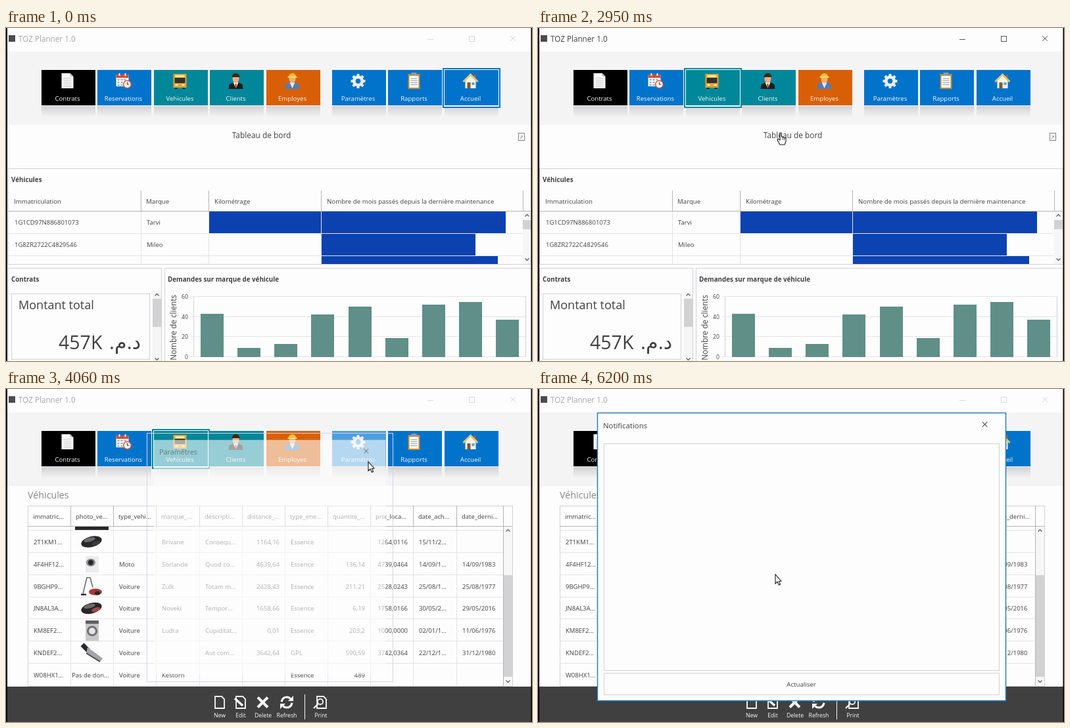
An HTML page with a canvas that plays this animation: 800x508 px, repeating every 7080 ms.

```html
<!DOCTYPE html>
<html lang="fr">
<head>
<meta charset="utf-8">
<title>Tableau de bord</title>
<style>
html, body { margin: 0; width: 100%; height: 100%; overflow: hidden; background: #fdfdfd; }
canvas { display: block; }
</style>
</head>
<body>
<canvas id="stage" width="800" height="508"></canvas>
<script>
const g = document.getElementById('stage').getContext('2d');
const LOOP = 7080, STEP = LOOP / 96;
const WHITE = '#fdfdfd', INK = '#404040', LINE = '#d2d2d6', SOFT = '#e4e4e8', MID = '#b4b4b8';
const BLUE = '#0273ca', TEAL = '#00879a', ORANGE = '#d95f06', BAR = '#0c42b0', DIALOG = '#2a7ebe';
const DARK = '#404040';

const clamp = v => Math.max(0, Math.min(1, v));
const ramp = (t, start, span) => clamp((t - start) / span);
const sine = u => (1 - Math.cos(Math.PI * u)) / 2;

function rect(x, y, w, h, color) {
  g.fillStyle = color;
  g.fillRect(x, y, w, h);
}
function frame(x, y, w, h, color, width = 1) {
  g.strokeStyle = color;
  g.lineWidth = width;
  g.strokeRect(x + .5, y + .5, w, h);
}
function path(points, color, width = 1, closed = false) {
  g.beginPath();
  points.forEach(([x, y]) => g.lineTo(x, y));
  if (closed) g.closePath();
  g.strokeStyle = color;
  g.lineWidth = width;
  g.stroke();
}
function poly(points, color) {
  g.beginPath();
  points.forEach(([x, y]) => g.lineTo(x, y));
  g.fillStyle = color;
  g.fill();
}
function oval(x, y, rx, ry, color, turn = 0) {
  g.beginPath();
  g.ellipse(x, y, rx, ry, turn, 0, Math.PI * 2);
  g.fillStyle = color;
  g.fill();
}
function text(s, x, y, size = 9.7, color = INK, align = 'left', weight = 400) {
  g.font = `${weight} ${size}px "Open Sans", "DejaVu Sans", sans-serif`;
  g.textAlign = align;
  g.fillStyle = color;
  g.fillText(s, x, y);
}
function at(x, y, scale, draw) {
  g.save();
  g.translate(x, y);
  g.scale(scale, scale);
  draw();
  g.restore();
}
const hline = (x, y, w, color = LINE) => rect(x, y, w, 1, color);
const vline = (x, y, h, color = LINE) => rect(x, y, 1, h, color);
const cross = (x, y, r, color, width = 1) => {
  path([[x - r, y - r], [x + r, y + r]], color, width);
  path([[x + r, y - r], [x - r, y + r]], color, width);
};
const chevron = (x, y, d) => path([[x - 3, y + d], [x, y - d], [x + 3, y + d]], '#606060', 1.3);

function scrollbar(x, top, bottom, thumbY, thumbH) {
  rect(x, top, 13, bottom - top, '#f6f6f7');
  chevron(x + 6.5, top + 6, 1.5);
  chevron(x + 6.5, bottom - 7, -1.5);
  rect(x, thumbY, 13, thumbH, '#d2d2d4');
}

// Icons are drawn around their own centre.
function gear(color, hole) {
  g.fillStyle = color;
  for (let i = 0; i < 8; i++) {
    g.save();
    g.rotate(i * Math.PI / 4);
    g.fillRect(-2, -11, 4, 5);
    g.restore();
  }
  oval(0, 0, 8.5, 8.5, color);
  oval(0, 0, 3.8, 3.8, hole);
}
function bus() {
  rect(-10, -11, 20, 21, '#eaa224');
  rect(-7, -9, 14, 3, '#fff0b0');
  rect(-8, -5, 16, 8, '#303034');
  rect(-7, 5, 4, 2, '#fff8e0');
  rect(3, 5, 4, 2, '#fff8e0');
  rect(-8, 10, 4, 2, '#303034');
  rect(4, 10, 4, 2, '#303034');
}
function sheet() {
  poly([[-9, -12], [4, -12], [9, -7], [9, 11], [-9, 11]], '#fafafa');
  poly([[4, -12], [4, -7], [9, -7]], '#c4c4c8');
  for (let y = -5; y < 9; y += 3) hline(-6, y, 12, '#c4c4c8');
}
function calendar() {
  rect(-11, -10, 19, 18, '#f8f8f8');
  rect(-11, -10, 19, 5, '#d84c34');
  rect(-7, -12, 2, 4, '#eeeeee');
  rect(2, -12, 2, 4, '#eeeeee');
  for (let i = 0; i < 9; i++) rect(-9 + i % 3 * 5, -3 + (i / 3 | 0) * 4, 3, 2, '#9ca8b8');
  oval(6, 5, 6.5, 6.5, '#d05838');
  oval(6, 5, 5, 5, '#f8f8f8');
  path([[6, 1.5], [6, 5], [9, 5]], '#404040', 1.2);
}
function person(hair, coat, shirt) {
  poly([[-11, 12], [-10, 5], [-4, 2], [4, 2], [10, 5], [11, 12]], coat);
  poly([[-4, 2], [4, 2], [0, 11]], shirt);
  oval(0, -4, 5, 7, '#e8b080');
  g.beginPath();
  g.arc(0, -6, 6, Math.PI, 0);
  g.fillStyle = hair;
  g.fill();
}
function client() {
  person('#44240c', '#1c1c20', '#f4f4f4');
  path([[0, 4], [0, 10]], '#b83018', 2);
}
function worker() {
  person('#f0c030', '#4880c0', '#f0e8d8');
  rect(-7, -7, 14, 2, '#f8d860');
}
function clipboard() {
  rect(-9, -11, 18, 23, '#c48a34');
  rect(-7, -8, 14, 18, '#fafafa');
  rect(-4, -13, 8, 5, '#98989c');
  for (let y = -4; y < 8; y += 3) hline(-5, y, 10, '#90a0a0');
}
function house() {
  rect(5, -10, 3, 6, '#b06030');
  poly([[-8, -2], [0, -9], [8, -2], [8, 11], [-8, 11]], '#f6f4ea');
  path([[-11, 1], [0, -10], [11, 1]], '#dcc878', 3);
  rect(-5, 2, 5, 9, '#8a5820');
  rect(2, 2, 4, 4, '#60a0d0');
}

const tiles = [
  ['Contrats', 54, '#000', sheet],
  ['Reservations', 139, BLUE, calendar],
  ['Vehicules', 225, TEAL, bus],
  ['Clients', 310, TEAL, client],
  ['Employes', 396, ORANGE, worker],
  ['Paramètres', 496, BLUE, null],
  ['Rapports', 581, BLUE, clipboard],
  ['Accueil', 667, BLUE, house]
];

function titleBar(active) {
  const ink = active ? INK : '#a8a8a8', control = active ? '#585858' : '#d8d8d8';
  rect(0, 0, 800, 36, WHITE);
  rect(4, 11, 10, 10, '#4c4c50');
  text('TOZ Planner 1.0', 19, 21, 11.7, ink);
  hline(641, 17, 9, control);
  frame(704, 12, 8, 8, control);
  cross(771, 16, 4, control);
}

function tileBar(focus, hover) {
  rect(0, 36, 800, 112, '#f4f4f5');
  const shade = g.createLinearGradient(0, 119, 0, 136);
  shade.addColorStop(0, 'rgba(120,120,124,.28)');
  shade.addColorStop(1, 'rgba(120,120,124,0)');
  tiles.forEach(([label, x, color, icon], i) => {
    rect(x, 119, 82, 17, shade);
    if (i === focus) {
      rect(x - 3, 61, 88, 61, color);
      rect(x - 1, 63, 84, 57, WHITE);
    }
    const fill = i === hover ? (color === BLUE ? '#4c9fdc' : '#4cabb8') : color;
    rect(x, 64, 82, 54, fill);
    at(x + 39.5, 81, 1, icon || (() => gear('#ececee', fill)));
    text(label, x + 39.5, 111, 9.6, '#f4f6f8', 'center');
  });
}

function panel(x, y, w, h, title) {
  frame(x, y, w, h, LINE);
  text(title, x + 5, y + 21, 9.8, INK, 'left', 700);
}

function dashboard() {
  rect(0, 148, 800, 360, WHITE);
  text('Tableau de bord', 388.5, 168, 11.9, INK, 'center');
  frame(779, 160, 9, 11, '#808080');
  path([[782, 169], [786, 165], [783, 165]], '#808080');

  panel(3, 214, 796, 146, 'Véhicules');
  ['Immatriculation', 'Marque', 'Kilométrage', 'Nombre de mois passés depuis la dernière maintenance']
    .forEach((s, i) => text(s, [12, 213, 317, 488][i], 268));
  [205, 308, 479, 786].forEach(x => vline(x, 248, 32, MID));
  [205, 308, 479].forEach(x => vline(x, 280, 80, SOFT));
  hline(4, 279, 795, MID);
  hline(4, 313, 782, SOFT);
  hline(4, 347, 782, SOFT);
  [['1G1CD97N886801073', 'Tarvi'], ['1G8ZR2722C4829546', 'Mileo']].forEach(([id, make], i) => {
    text(id, 13, 300 + i * 34, 9.5);
    text(make, 214, 300 + i * 34, 9.5);
  });
  rect(309, 280, 170, 33, BAR);
  rect(480, 280, 280, 33, BAR);
  rect(480, 314, 234, 33, BAR);
  rect(480, 348, 268, 12, BAR);
  scrollbar(786, 280, 360, 293, 14);

  panel(3, 366, 233, 150, 'Contrats');
  frame(8, 405, 210, 100, LINE);
  text('Montant total', 19, 429, 18);
  text('457K', 80, 490, 28.5);
  g.direction = 'rtl';
  text('د.م.', 205, 490, 30, INK, 'right');
  g.direction = 'ltr';
  scrollbar(223, 401, 512, 413, 43);

  panel(241, 366, 558, 150, 'Demandes sur marque de véhicule');
  frame(285, 409, 505, 92, LINE);
  [60, 40, 20, 0].forEach((n, i) => {
    const y = 409 + i * 30.7;
    hline(281, Math.round(y), 509, SOFT);
    text(n, 277, y + 4, 8.7, INK, 'right');
  });
  g.save();
  g.translate(259, 457);
  g.rotate(-Math.PI / 2);
  text('Nombre de clients', 0, 0, 11.7, INK, 'center');
  g.restore();
  [436, 488, 482, 437, 425, 473, 422, 418, 445]
    .forEach((top, i) => rect(Math.round(296 + i * 56.15), top, 35, 502 - top, '#5f8f88'));
}

const columns = ['immatric...', 'photo_ve...', 'type_vehi...', 'marque_...', 'descripti...', 'distance_...',
  'type_ene...', 'quantite_...', 'prix_loca...', 'date_ach...', 'date_derni...'];
const rows = `2T1KM1...|||Brivane|Consequ...|1164,16|Essence||1264,0116|15/11/2...|
4F4HF12...||Moto|Sorlande|Quod co...|4639,64|Essence|136,14|4739,0464|14/09/1...|14/09/1983
9BGHP9...||Voiture|Zulk|Totam m...|2428,43|Essence|211,21|2528,0243|25/08/1...|25/08/1977
JN8AL3A...||Voiture|Noveki|Tempor...|1658,66|Essence|6,19|1758,0166|30/05/2...|29/05/2016
KM8EF2...||Voiture|Ludra|Cupiditat...|0,01|Essence|203,2|1000,0000|02/01/1...|11/06/1976
KNDEF2...||Voiture||Aut com...|3642,64|GPL|590,59|3742,0364|22/12/1...|31/12/1980
W08HX1...|Pas de don...|Voiture|Kestorn|||Essence|489|||`.split('\n').map(r => r.split('|'));

function mouse(accent) {
  oval(0, 0, 16, 8, '#28282a', -.25);
  oval(-3, -3, 9, 3, '#6c6c70', -.25);
  oval(7, 2, 7, 3, accent, -.3);
}
const photos = [
  () => mouse('#3c3c40'),
  () => {
    rect(-9, -12, 20, 25, '#ececee');
    oval(-1, -2, 7, 6, '#8c8c90');
    oval(-1, -2, 4, 4, '#28282a');
  },
  () => {
    path([[-13, 12], [-7, -13], [-2, -13], [2, 2]], '#58585c', 1.4);
    path([[-16, 13], [-8, 13]], '#303034', 2.5);
    oval(6, 9, 10, 5, '#a83838');
    oval(9, 11, 4, 3, '#28282a');
  },
  () => mouse('#a04c44'),
  () => {
    rect(-9, -15, 20, 31, '#c8c8cc');
    rect(-9, -15, 20, 5, '#606064');
    oval(1, 1, 8, 8, '#707074');
    oval(1, 1, 5, 5, '#e4e4e6');
  },
  () => {
    path([[-14, -12], [-5, -3]], '#28282a', 7);
    poly([[-6, -8], [17, 9], [13, 14], [-8, 1]], '#a4a4a8');
    path([[-8, 1], [13, 14]], '#404044', 1.5);
  }
];

function vehicles() {
  const colX = i => Math.round(33 + i * 65.15);
  rect(0, 148, 800, 306, WHITE);
  text('Véhicules', 33, 167, 14.3, '#868686');
  frame(33, 178, 737, 275, LINE);
  columns.forEach((s, i) => {
    text(s, colX(i) + 8, 198, 9.5);
    if (i) {
      vline(colX(i), 178, 31, MID);
      vline(colX(i), 210, 243, SOFT);
    }
  });
  vline(756, 178, 275, MID);
  hline(33, 209, 737, MID);
  hline(33, 215, 723, SOFT);
  rect(105, 210, 51, 5, '#28282a');
  rows.forEach((row, r) => {
    const y = 237 + r * 33.8;
    if (r < 6) hline(33, Math.round(y + 12), 723, SOFT);
    row.forEach((s, i) => {
      const right = i === 5 || i === 7 || i === 8;
      const x = right ? colX(i + 1) - 8 : colX(i) + (i === 1 ? 2 : 9);
      text(s, x, y, 9.5, INK, right ? 'right' : 'left');
    });
    if (photos[r]) at(130, y - 4, 1, photos[r]);
  });
  scrollbar(757, 210, 453, 284, 155);
  toolbar();
}

function toolbar() {
  const pale = '#f8f8f8';
  rect(0, 454, 800, 54, DARK);
  [['New', 325], ['Edit', 357], ['Delete', 391], ['Refresh', 427], ['Print', 479]]
    .forEach(([s, x]) => text(s, x, 501, 8.7, pale, 'center'));
  [325, 357, 480].forEach(x => path(
    [[x - 7, 469], [x + 3, 469], [x + 7, 473], [x + 7, 487], [x - 7, 487]], pale, 1.8, true));
  path([[348, 472], [360, 483]], pale, 3.5);
  cross(390.5, 478, 7.5, pale, 4);
  for (const turn of [0, Math.PI]) {
    at(427, 478, 1, () => {
      g.rotate(turn);
      g.beginPath();
      g.arc(0, 0, 8, Math.PI * 1.03, Math.PI * 1.75);
      g.strokeStyle = pale;
      g.lineWidth = 3.2;
      g.stroke();
      poly([[2, -2], [10, -2], [10, -10]], pale);
    });
  }
  vline(454, 466, 38, pale);
  oval(478, 477, 5, 5, pale);
  oval(478, 477, 3.2, 3.2, DARK);
  path([[475, 480], [468, 487]], pale, 2.4);
}

// While a window grows, only its outer glow has the final size.
function dialog(x, y, w, h, title, p, body) {
  if (p <= 0) return;
  const cx = x + w / 2, cy = y + h / 2, scale = .86 + .14 * p;
  if (p < 1) frame(x, y, w, h, '#d4d6e6');
  g.save();
  g.globalAlpha = p;
  g.translate(cx, cy);
  g.scale(scale, scale);
  g.translate(-cx, -cy);
  rect(x, y, w, h, WHITE);
  if (p === 1) frame(x, y, w, h, DIALOG, 1.5);
  text(title, x + 9, y + 23.5, 11.4);
  cross(x + w - 31.5, y + 18, 3.8, '#505050', 1.1);
  if (body) body();
  g.restore();
}

function checkbox(y, label) {
  frame(235, y, 10, 10, MID);
  path([[237, y + 5], [239.5, y + 8], [243.5, y + 3]], INK, 1.2);
  text(label, 259, y + 9.5);
}

function settings() {
  hline(215, 106, 85);
  vline(300, 106, 26);
  hline(300, 132, 288);
  at(237, 116, .36, () => gear('#707074', WHITE));
  at(242, 121, .28, () => gear('#707074', WHITE));
  text('Général', 247.5, 123);
  at(323, 119, .55, bus);
  text('Véhicule', 333, 123, 9.5);
  checkbox(154, 'Activer les notifications');
  text('Fréquence (en secondes)', 225, 191);
  frame(225, 196, 352, 30, LINE);
  vline(552, 196, 31);
  hline(552, 211, 25);
  poly([[561.5, 205], [567.5, 205], [564.5, 202]], '#686868');
  poly([[561.5, 218], [567.5, 218], [564.5, 221]], '#686868');
  text('1000', 544, 215.5, 9.7, INK, 'right');
  checkbox(242, "Activer l'effet sonore de notification");
  const link = 'Voir la liste des notifications actuelles';
  text(link, 225, 279);
  hline(225, 281, g.measureText(link).width, INK);
}

function notifications() {
  frame(100, 83, 601, 346, LINE);
  frame(100, 433, 601, 33, LINE);
  text('Actualiser', 400.5, 454, 9.7, INK, 'center');
}

// Pointer stops: time, x, y.
const route = [
  [870, 640, 440], [1250, 572, 16], [1550, 572, 16], [2150, 264, 92], [2600, 264, 92], [2950, 368, 160],
  [3250, 549, 107], [3700, 549, 107], [3900, 551, 111], [4500, 551, 111], [5170, 358, 276],
  [5600, 358, 276], [5900, 361, 283]
];
function pointer(t) {
  if (t < route[0][0]) return;
  let i = route.findIndex(stop => stop[0] > t);
  if (i < 0) i = route.length;
  const a = route[i - 1], b = route[i] || a;
  const u = a === b ? 0 : sine((t - a[0]) / (b[0] - a[0]));
  const hand = (t > 2080 && t < 3900) || (t > 5100 && t < 5780);
  const shape = hand
    ? [[0, 0], [2, 0], [2.5, 6], [9, 8], [9, 13], [7, 18], [0, 18], [-4, 11], [-3, 9], [0, 11]]
    : [[0, 0], [0, 14], [3, 11], [5.5, 16], [7.5, 15], [5.5, 10.5], [9, 10]];
  at(a[1] + (b[1] - a[1]) * u, a[2] + (b[2] - a[2]) * u, 1, () => {
    poly(shape, '#fff');
    path(shape, '#181818', 1.1, true);
    if (hand) [4, 6.5].forEach(x => path([[x, 7.5], [x, 11]], '#181818', .8));
  });
}

function draw(t) {
  rect(0, 0, 800, 508, WHITE);
  const slide = sine(ramp(t, 2910, 722));
  const shifted = (x, alpha, page) => {
    g.save();
    g.globalAlpha = alpha;
    g.translate(x, 0);
    page();
    g.restore();
  };
  if (slide < 1) shifted(-133 * slide, 1 - .8 * slide, dashboard);
  if (slide > 0) shifted(800 * (1 - slide), slide < 1 ? .92 * slide : 1, vehicles);

  titleBar(t > 1200 && t < 3910);
  const hover = t > 2080 && t < 2350 ? 2 : t > 3180 && t < 4200 ? 5 : -1;
  tileBar(t < 2350 ? 7 : t < 4150 ? 2 : 5, hover);
  rect(0, 0, 2, 508, '#000');
  rect(798.5, 0, 1.5, 508, '#000');

  dialog(214, 67, 374, 379, 'Paramètres', ramp(t, 3910, 245), t > 4180 && settings);
  dialog(90, 36, 621, 439, 'Notifications', ramp(t, 5800, 245), t > 6040 && notifications);
  pointer(t);
}

function tick(now) {
  draw(Math.floor((now % LOOP + 5) / STEP) % 96 * STEP);
  requestAnimationFrame(tick);
}
requestAnimationFrame(tick);
</script>
</body>
</html>
```
